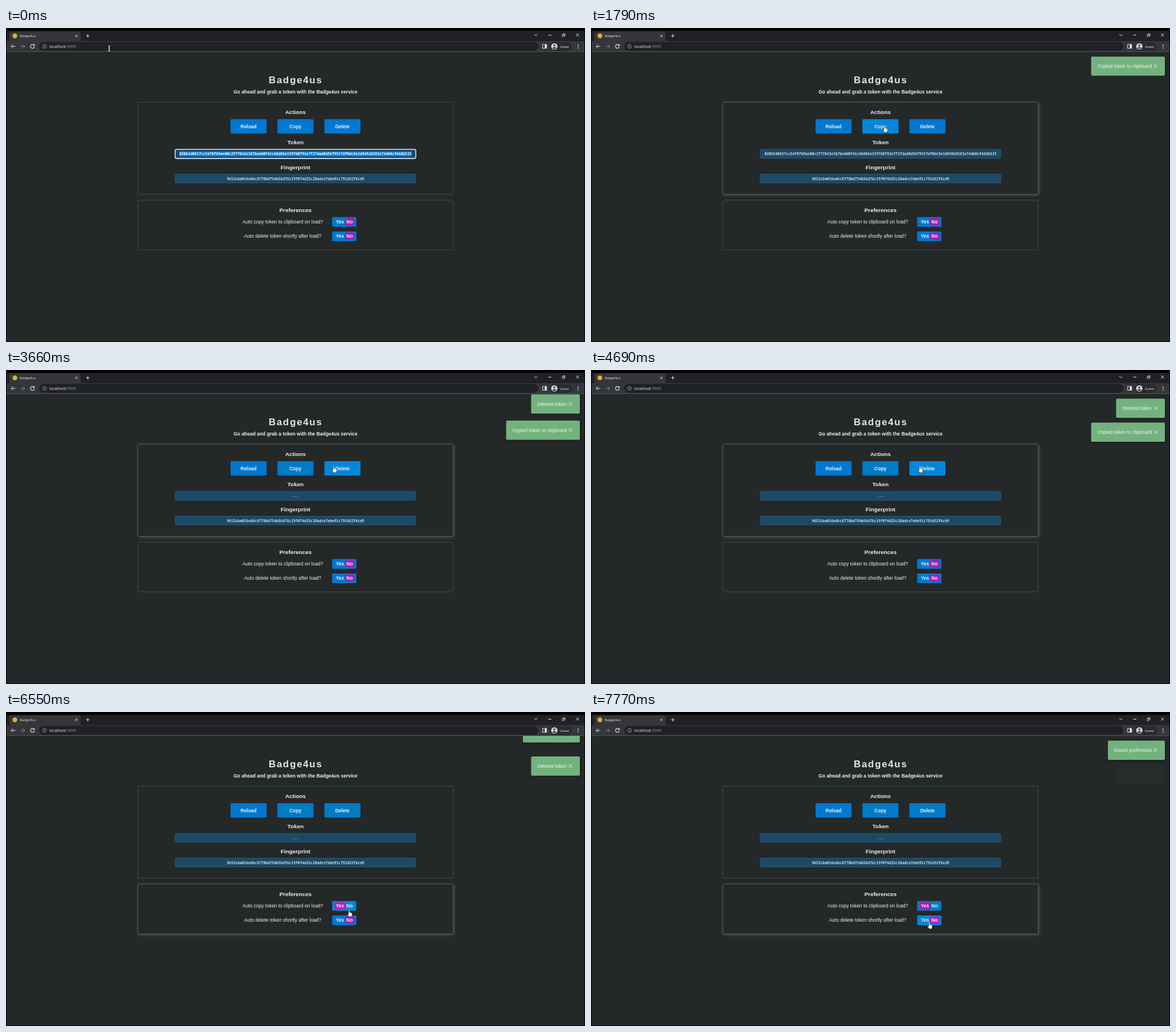
Write an HTML page that moves like this. It is 1016x551 px and loops after 8000 ms.

```html
<!DOCTYPE html>
<html lang="en">
<head>
<meta charset="utf-8">
<title>Badge4us</title>
<style>
html, body { margin: 0; width: 100%; height: 100%; overflow: hidden; background: #000; }
svg { display: block; font: 8.47px "Liberation Sans", Arial, sans-serif; fill: #eee; }
.ui { font-family: "Open Sans", "Noto Sans", sans-serif; }
.mid { text-anchor: middle; }
.bold, h3 { font-weight: 700; }
.head { font-size: 9.9px; }
.mono { font: 600 6.297px "Noto Sans Mono", "DejaVu Sans Mono", monospace; fill: #d6d9d6; }
.line { fill: none; stroke: #e4e5e7; stroke-width: 1; }
.card { fill: #242829; stroke: #4c5154; stroke-width: .8; filter: drop-shadow(0 0 1px #5553); }
.card.hover { stroke: #5a5f62; filter: drop-shadow(1px 1px 2.5px #777c80aa); }
.field { fill: #1b4a69; stroke: #3a617a; stroke-width: .7; }
.toast rect { fill: #73b27e; filter: drop-shadow(1px 1px 1.5px #0006); }
</style>
</head>
<body>
<svg id="stage" width="1016" height="551" viewBox="0 0 1016 551">
  <defs><clipPath id="page"><rect x="1" y="42" width="1014" height="508"/></clipPath></defs>

  <!-- browser window -->
  <rect x="1" y="5" width="1014" height="19" fill="#202124"/>
  <path d="M3 23.5q3 0 3-3V9q0-3 3-3H128q3 0 3 3v11.500q0 3 3 3z" fill="#35363a"/>
  <rect x="1" y="23" width="1014" height="19" fill="#35363a"/>
  <rect x="1" y="41" width="1014" height="1" fill="#505256"/>
  <rect x="58" y="24.500" width="876" height="15.500" rx="7.750" fill="#202124"/>
  <rect x="954" y="25" width="39" height="15" rx="7.500" fill="#292a2d"/>
  <circle cx="15.600" cy="13.700" r="4.200" fill="#e2ad36"/>
  <g class="ui">
    <text x="24" y="16" font-size="6.100">Badge4us</text>
    <text x="76" y="34.700" font-size="7">localhost<tspan fill="#96999d">:9999</tspan></text>
    <text x="972" y="34.500" font-size="5.900">Guest</text>
  </g>
  <g class="line">
    <path d="M121.500 11.700l4 4m0-4l-4 4M140.500 13.700h6m-3-3v6M927 11l2.700 2.700L932.400 11M951.500 12.500h5.500M1000.300 9.800l5 5m0-5l-5 5"/>
    <path d="M976 11.500h3.500v3.500h-3.500zM977.500 11.500v-1.500h3.500v3.500h-1.500" stroke-width=".8"/>
    <path d="M16.500 32.300h-7.500m3.500-3.500l-3.500 3.500l3.500 3.500"/>
    <path d="M25.500 32.300h7.500m-3.500-3.500l3.500 3.500l-3.500 3.500" stroke="#85878b"/>
    <path d="M49.300 30.300a3.400 3.400 0 1 0 .5 2.700M49.700 28.500v2.500h-2.500" stroke-width="1.200"/>
    <circle cx="67.600" cy="32.300" r="3.300" stroke="#a5a8ac" stroke-width=".8"/>
    <path d="M67.600 31.800v2.200m0-3.800v.8" stroke="#a5a8ac"/>
    <rect x="941.700" y="29" width="6.800" height="6.500"/>
  </g>
  <rect x="945.500" y="29" width="3" height="6.500"/>
  <circle cx="962.200" cy="32.300" r="5.600" fill="#d2d4d8"/>
  <circle cx="962.200" cy="30.600" r="1.800" fill="#45484d"/>
  <path d="M958.600 35.500q3.600-4.600 7.200 0q-3.600 3-7.200 0z" fill="#45484d"/>
  <path d="M1003.200 28.800h1.500v1.500h-1.500zm0 2.800h1.500v1.500h-1.500zm0 2.800h1.500v1.500h-1.500z"/>

  <!-- page -->
  <rect x="1" y="42" width="1014" height="508" fill="#242829"/>
  <rect class="card" id="card1" x="231.500" y="130.300" width="553" height="161.400" rx="2.500"/>
  <rect class="card" id="card2" x="231.500" y="302" width="553" height="87.300" rx="2.500"/>
  <g class="mid bold">
    <text x="508.300" y="97.300" font-size="16.930" letter-spacing="1.690" fill="#e6e6e1">Badge4us</text>
    <text x="508" y="115.200">Go ahead and grab a token with the Badge4us service</text>
    <g class="head">
      <text x="508" y="151.400">Actions</text>
      <text x="508" y="204.300">Token</text>
      <text x="508" y="247.600">Fingerprint</text>
      <text x="508" y="323.300">Preferences</text>
    </g>
  </g>
  <g class="mid">
    <text x="485.700" y="343">Auto copy token to clipboard on load?</text>
    <text x="485.500" y="368.300">Auto delete token shortly after load?</text>
  </g>
  <rect class="field" x="296.800" y="213" width="422.200" height="15.700" rx="2"/>
  <rect class="field" x="296.800" y="256.400" width="422.200" height="15.500" rx="2"/>
  <g id="focus">
    <rect x="296.700" y="212.800" width="422.400" height="16.200" rx="2.800" fill="none" stroke="#fff" stroke-width="1.300"/>
    <rect x="303.800" y="216.500" width="408.400" height="9" fill="#0078d7"/>
  </g>
  <text class="mono mid" id="token" x="508" y="223.200"></text>
  <text class="mono mid" x="508" y="266.500">9652cba016ed6c8778bd754b56d76c19f074d25c28adce7ebe91c791d32f6cd9</text>
  <g id="buttons" class="mid bold"></g>
  <g id="toasts" clip-path="url(#page)"></g>

  <!-- pointer -->
  <circle id="click" r="6.500" fill="#7dbd48" opacity=".9"/>
  <g id="pointer">
    <path id="beam" class="line" d="M-2-4.500q2 0 2 1v7q0 1-2 1M2-4.500q-2 0-2 1v7q0 1 2 1" stroke-width=".9"/>
    <path id="arrow" d="M0 0v8.500l2-1.800l1.400 3l1.500-.7l-1.400-2.900h2.700z" fill="#fff" stroke="#111" stroke-width=".5"/>
    <path id="hand" d="M-1 .8q1-1.600 2 0v3.700l3.300.8q1.300.4 1.200 1.900l-.8 4.800h-4.800l-3-4q.5-1.400 2.100.2z" fill="#fff" stroke="#111" stroke-width=".6"/>
  </g>
</svg>
<script>
const LOOP = 8000;
const SECRET = "02061d0657cc54f8f69ae00c2f7f842e1b7bedd0f41c66d86e159760792eff27dad8d56f955fdf0dc8e1d949d3583e74d60c9468b535";
const $ = id => document.getElementById(id);
const clamp = v => Math.max(0, Math.min(1, v));
const smooth = v => (v = clamp(v)) * v * (3 - 2 * v);

function add(parent, tag, attrs, text = "") {
  const el = document.createElementNS("http://www.w3.org/2000/svg", tag);
  for (const k in attrs) el.setAttribute(k, attrs[k]);
  el.textContent = text;
  return parent.appendChild(el);
}

// pointer path: time, x, y
const path = [
  [70, 181, 36], [830, 513, 170], [900, 513, 170], [1040, 515, 171],
  [2520, 515, 171], [2920, 575, 168], [4060, 575, 168], [4080, 577, 168],
  [4690, 577, 168], [5460, 611, 320], [5530, 611, 320], [5810, 601, 341],
  [6140, 601, 341], [6260, 602, 347], [6600, 602, 347], [6900, 600, 360],
  [6960, 600, 360], [7700, 593.500, 368.500], [LOOP, 593.500, 368.500]
];
const clicks = [1240, 3320, 6260];

function pointerAt(t) {
  const i = path.findIndex(p => p[0] > t);
  if (i < 1) return path[0].slice(1);
  const [t0, x0, y0] = path[i - 1], [t1, x1, y1] = path[i];
  const k = smooth((t - t0) / (t1 - t0));
  return [x0 + (x1 - x0) * k, y0 + (y1 - y0) * k];
}

// "left" is the time the pointer leaves; the colour then stays a little duller
function makeButton(x, y, w, h, left, label) {
  const box = add($("buttons"), "rect", { x, y, width: w, height: h, rx: 2 });
  const b = { x, y, w, h, left, box };
  if (label) add($("buttons"), "text", { x: x + w / 2, y: y + 15.500 }, label);
  else {
    b.pill = add($("buttons"), "rect", { y: y + 1.800, height: 12.400, rx: 2.200 });
    add($("buttons"), "text", { x: 586, y: y + 11 }, "Yes");
    add($("buttons"), "text", { x: 603, y: y + 11 }, "No");
  }
  return b;
}
const buttons = [
  makeButton(394, 160, 63.300, 25.300, LOOP, "Reload"),
  makeButton(476.300, 160, 63.300, 25.300, 2520, "Copy"),
  makeButton(558.700, 160, 63.300, 25.300, 4690, "Delete"),
  makeButton(572.300, 331.800, 42.400, 17, 6600),
  makeButton(572.300, 357, 42.400, 17, LOOP)
];

const toasts = [
  ["Copied token to clipboard", 877.600, 1350],
  ["Deleted token", 921.400, 3380],
  ["Saved preference", 907, 6400]
].map(([text, x, start]) => {
  const g = add($("toasts"), "g", { class: "toast" });
  add(g, "rect", { x, y: 0, width: 1007 - x, height: 33.700, rx: 2 });
  add(g, "text", { x: 984.200, y: 19.800, "text-anchor": "end", fill: "#f0f6f0" }, text);
  add(g, "path", { d: "M988 14l5.400 5.400m0-5.400l-5.400 5.400", stroke: "#b9d9be", "stroke-width": 1.400 });
  return { g, start };
});

const inside = (b, x, y) => x >= b.x && x <= b.x + b.w && y >= b.y && y <= b.y + b.h;
const show = (el, on) => el.setAttribute("visibility", on ? "visible" : "hidden");
const move = (el, x, y) => el.setAttribute("transform", `translate(${x} ${y})`);

function draw(t) {
  const [x, y] = pointerAt(t);
  const over = buttons.find(b => inside(b, x, y));
  const overField = x > 297 && x < 719 && (y > 213 && y < 229 || y > 256 && y < 272);

  buttons.forEach((b, i) => {
    const hover = b === over;
    b.box.setAttribute("fill", hover ? "#0087da" : t >= b.left ? "#007bc6" : "#0078d0");
    if (!b.pill) return;
    const yes = i === 3 && t >= 6330;
    b.pill.setAttribute("x", yes ? 576.500 : 595);
    b.pill.setAttribute("width", yes ? 19 : 16);
    b.pill.setAttribute("fill", hover ? "#b51fc2" : "#a31cb1");
  });

  $("card1").classList.toggle("hover", x > 231 && x < 785 && y > 130 && y < 292);
  $("card2").classList.toggle("hover", x > 231 && x < 785 && y > 302 && y < 390);
  show($("focus"), t < 1240);
  $("token").textContent = t < 3380 ? SECRET : "...";
  $("token").style.fill = t < 1240 ? "#fff" : "";

  // each new toast drops in and pushes the older ones down
  const rest = toasts.map(o => (1 - clamp((t - o.start) / 500)) ** 3);
  toasts.forEach(({ g, start }, i) => {
    const push = rest.slice(i + 1).reduce((sum, r) => sum + 42 * (1 - r), 0);
    move(g, 0, 50.300 - 90 * rest[i] + push);
    g.setAttribute("opacity", 1 - smooth((t - start - 3870) / 580));
    show(g, t >= start);
  });

  show($("click"), clicks.some(c => t >= c && t < c + 150));
  move($("click"), x, y);
  move($("pointer"), x, y);
  const beam = y < 41 || overField;
  show($("beam"), beam);
  show($("hand"), !beam && over);
  show($("arrow"), !beam && !over);
}

const begin = performance.now();
function tick() {
  draw((performance.now() - begin) % LOOP);
  requestAnimationFrame(tick);
}
tick();
</script>
</body>
</html>
```
